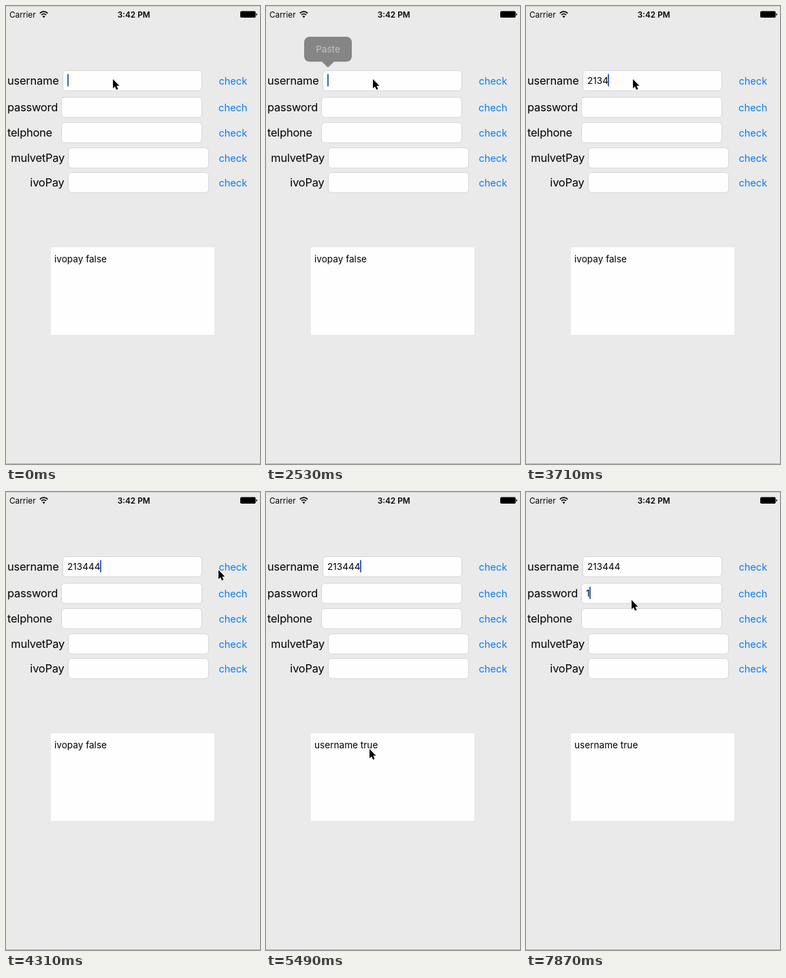
An HTML page that plays this animation: 373 by 670 pixels, repeating every 8000 ms.

```html
<!DOCTYPE html>
<html lang="en">
<head>
<meta charset="utf-8">
<title>Form check</title>
<style>
  html, body { margin: 0; width: 100%; height: 100%; overflow: hidden; background: #eaeaea; }
  svg { display: block; width: 373px; height: 670px; font-family: Inter, "Liberation Sans", sans-serif; }
  .label { font-size: 16.4px; letter-spacing: -.2px; }
  .button { font-size: 14.6px; fill: #087cf7; }
  .input { font-size: 13.6px; }
  .status { font-size: 11.8px; }
  .field { fill: #fefefe; stroke: #d6d6d6; }
</style>
</head>
<body>
<svg viewBox="0 0 373 670">
  <rect width="373" height="670" fill="#eaeaea"/>
  <rect width="373" height="1" fill="#d0d0d0"/>
  <rect y="669" width="373" height="1" fill="#b4b4b4"/>

  <text class="status" x="5" y="17">Carrier</text>
  <g fill="none" stroke="#000" stroke-width="1.7">
    <path d="M49.8 10.6a8 8 0 0 1 11.4 0M51.9 13a5.2 5.2 0 0 1 7.2 0"/>
    <path d="M55.5 17.2l-2-2.1a2.9 2.9 0 0 1 4 0z" fill="#000" stroke="none"/>
  </g>
  <text class="status" x="187.7" y="17" text-anchor="middle" font-weight="600">3:42 PM</text>
  <rect x="344" y="7.6" width="22.6" height="9.4" rx="1.8"/>
  <path d="M367.4 10.6q1.6.4 1.6 1.7t-1.6 1.7z"/>

  <g id="rows"></g>
  <rect x="66" y="353" width="240" height="128" fill="#fefefe"/>
  <text id="username" class="input" x="90" y="114"></text>
  <text id="password" class="input" x="88" y="153"></text>
  <text id="note" class="input" x="71" y="375"></text>
  <rect id="caret" width="2" height="18" rx=".5" fill="#3c60dc"/>

  <g id="popup">
    <path d="M64 45h54a8 8 0 0 1 8 8v20.5a8 8 0 0 1-8 8h-18l-9 8.500l-9-8.500h-18a8 8 0 0 1-8-8v-20.5a8 8 0 0 1 8-8z" fill="#222"/>
    <text class="input" x="91" y="68" text-anchor="middle" fill="#fff">Paste</text>
  </g>

  <g id="pointer">
    <path id="arrow" d="M1 1V14.5L4 11.7L6.1 16.6L8.5 15.6L6.4 10.8H10.5Z" stroke="#fff" stroke-width="1.8" paint-order="stroke"/>
  </g>
</svg>
<script>
const LOOP = 8000;
const BEAT = 148.4; // the screen refreshes once per beat

const $ = id => document.getElementById(id);
const clamp = v => Math.min(1, Math.max(0, v));

function add(parent, tag, attrs, text = "") {
  const node = document.createElementNS("http://www.w3.org/2000/svg", tag);
  for (const key in attrs) node.setAttribute(key, attrs[key]);
  node.textContent = text;
  parent.append(node);
  return node;
}

function addRow(label, x, anchor, left, right, top, action = "check") {
  const y = top + 20.5;
  const rows = $("rows");
  add(rows, "text", { class: "label", x, y, "text-anchor": anchor }, label);
  add(rows, "rect", { class: "field", x: left, y: top, width: right - left, height: 29.5, rx: 5 });
  return add(rows, "text", { class: "button", x: 333.3, y, "text-anchor": "middle" }, action);
}

const firstButton = addRow("username", 2, "start", 83.5, 287.5, 94.5);
addRow("password", 2, "start", 81.5, 287.5, 133.5, "chech");
addRow("telphone", 2, "start", 81.5, 287.5, 170.5);
addRow("mulvetPay", 86, "end", 91.5, 297.5, 207.5);
addRow("ivoPay", 85.5, "end", 91.5, 297.5, 243.5);

// Stops of the pointer; it eases from one to the next.
const stops = [
  { beat: 27, x: 156, y: 106 },
  { beat: 29, x: 311, y: 113 },
  { beat: 33, x: 325, y: 109 },
  { beat: 37, x: 151, y: 375 },
  { beat: 41, x: 177, y: 360 },
  { beat: 43, x: 134, y: 166 },
  { beat: 46, x: 154, y: 157 }
];

function pointerAt(beat) {
  const next = stops.findIndex(stop => stop.beat > beat);
  if (next < 0) return stops[stops.length - 1];
  const to = stops[next], from = stops[next - 1] || to;
  const k = clamp((beat - from.beat) / (to.beat - from.beat || 1));
  const ease = k * k * (3 - 2 * k);
  return { x: from.x + (to.x - from.x) * ease, y: from.y + (to.y - from.y) * ease };
}

// The caret stays solid for four beats after any activity, then blinks every seven.
function caretOpacity(beat) {
  const active = beat < 15 ? -2 : beat < 40 ? Math.min(beat, 28) : beat < 44 ? 40 : 44;
  const idle = beat - active - 4;
  return idle < 0 ? 1 : clamp(.5 + (Math.abs(idle % 7 - 1.5) - 1.5) / 2);
}

function draw(t) {
  const beat = Math.floor((t + 10) / BEAT);

  const typed = Math.floor((beat - 17.55) / 1.7);
  $("username").textContent = "213444".slice(0, Math.max(0, typed));
  $("password").textContent = beat < 53 ? "" : "1";
  $("note").textContent = beat < 32 ? "ivopay false" : "username true";

  const focus = $(beat < 40 ? "username" : beat < 44 ? "note" : "password");
  const length = focus.textContent ? focus.getComputedTextLength() - .6 : 0;
  const caret = $("caret");
  caret.setAttribute("x", Math.round(+focus.getAttribute("x") + length));
  caret.setAttribute("y", focus.getAttribute("y") - 14.5);
  caret.setAttribute("opacity", caretOpacity(beat));

  const popup = Math.min(clamp((beat - 16) / 2), clamp((22 - beat) / 2) ** 2);
  for (const part of $("popup").children) part.setAttribute("opacity", popup);

  firstButton.setAttribute("opacity", clamp(.25 + .375 * Math.abs(beat - 31)));

  const { x, y } = pointerAt(beat);
  $("pointer").setAttribute("transform", `translate(${x} ${y})`);
}

function tick() {
  draw(performance.now() % LOOP);
  requestAnimationFrame(tick);
}
tick();
</script>
</body>
</html>
```
